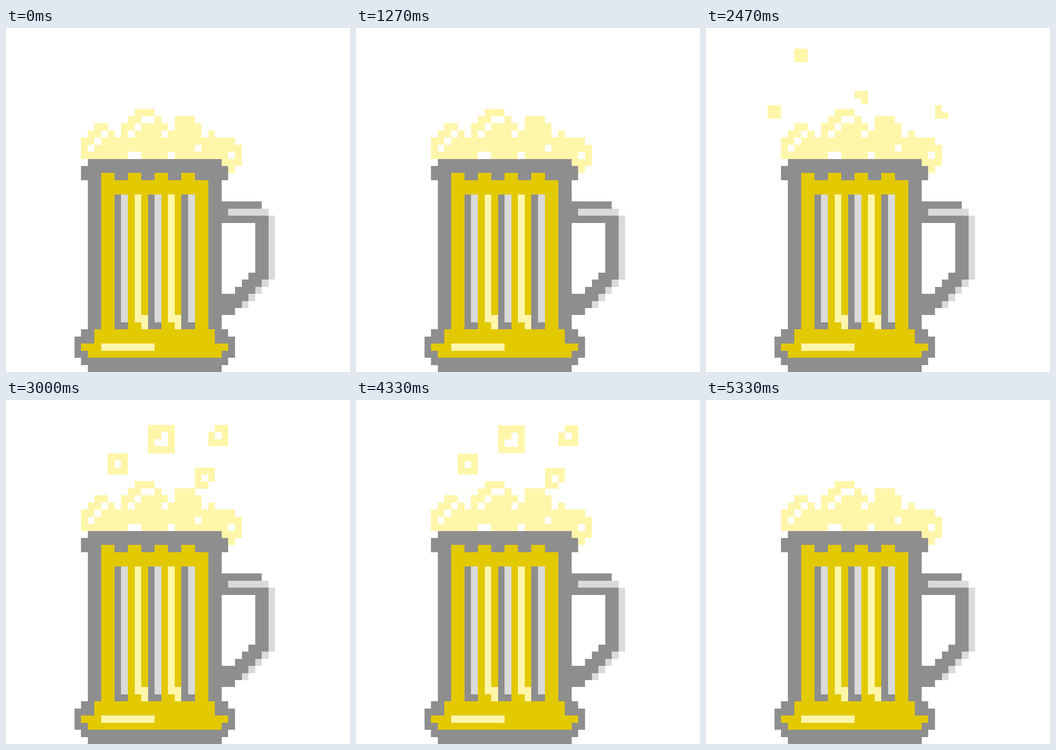
Animation, 748 px wide and 748 px high, one loop 5430 ms. Source, as an HTML page with a canvas:

```html
<!DOCTYPE html>
<html lang="en">
<head>
<meta charset="utf-8">
<title>Beer mug</title>
<style>
html, body { margin: 0; width: 100%; height: 100%; overflow: hidden; background: #fff; }
canvas { display: block; }
</style>
</head>
<body>
<canvas id="stage" width="748" height="748"></canvas>
<script>
const ctx = document.getElementById('stage').getContext('2d');
const CW = 14.56, CH = 15.45, LEFT = 148.5, TOP = 176.35;
const WHITE = '#fff', FOAM = '#fff6aa', GOLD = '#e2c900', GRAY = '#8e8e8e', LIGHT = '#dadada';
const LOOP = 5430, STARTS = [8, 48, 89, 130];
const BIG_STEPS = 16, ALL_STEPS = 30;

// Fills a block of grid cells; top is the y of row 0, crop trims the lower edge.
function block(color, col, row, w = 1, h = 1, top = TOP, crop = 0) {
  const x0 = Math.round(LEFT + col * CW), x1 = Math.round(LEFT + (col + w) * CW);
  const y0 = Math.round(top + row * CH), y1 = Math.round(top + (row + h) * CH - crop);
  ctx.fillStyle = color;
  ctx.fillRect(x0, y0, x1 - x0, y1 - y0);
}

function foam() {
  const f = (...a) => block(FOAM, ...a), hole = (...a) => block(WHITE, ...a);
  f(9, 0, 3);
  f(8, 1, 2); f(12, 1); f(15, 1, 3);
  f(3, 2, 2); f(7, 2, 2); f(10, 2, 4); f(15, 2, 4);
  f(2, 3, 2); f(5, 3); f(7, 3); f(9, 3, 4); f(14, 3, 5); f(20, 3);
  f(1, 4, 23); f(1, 5, 24, 2);
  f(22, 7, 3); f(23, 8);
  hole(3, 4); hole(2, 5); hole(18, 5);
  hole(8, 6, 2); hole(14, 6); hole(23, 6);
}

function body() {
  const g = (...a) => block(GRAY, ...a), b = (...a) => block(GOLD, ...a);
  g(2, 7, 20, 24);
  g(1, 8, 22, 2);
  b(4, 10, 16, 21);
  for (let c = 4; c <= 16; c += 4) b(c, 9, 2);
  for (const c of [6, 11, 16]) {
    g(c, 12, 2, 19);
    block(LIGHT, c + 1, 12, 1, 18);
  }
  for (const c of [9, 14]) {
    block(FOAM, c, 12, 1, 18);
    block(FOAM, c + 1, 29, 1, 2);
  }
}

function base() {
  const g = (...a) => block(GRAY, ...a), b = (...a) => block(GOLD, ...a);
  g(1, 31, 22); g(0, 32, 24, 3); g(1, 35, 22); g(2, 36, 20);
  b(3, 31, 18, 2); b(1, 33, 22); b(2, 34, 20);
  block(FOAM, 4, 33, 8);
}

function handle() {
  const g = (...a) => block(GRAY, ...a), l = (...a) => block(LIGHT, ...a);
  g(22, 13, 6); g(22, 14); l(23, 14, 6); g(22, 15, 7);
  g(27, 16, 2, 8); l(29, 15, 1, 9);
  g(26, 23);
  for (let i = 0; i < 4; i++) {
    g(25 - i, 24 + i, 3);
    l(28 - i, 24 + i);
  }
  g(22, 26, 2, 3);
}

function bigBubbles(top, crop) {
  const ring = (col, row, n) => block(FOAM, col, row, n, n, top, crop);
  const hole = (col, row, w = 1) => block(WHITE, col, row, w, 1, top);
  ring(11, 0, 4); hole(13, 1); hole(12, 2, 2);
  ring(20, 0, 3); hole(20, 0); hole(21, 1);
  ring(5, 4, 3); hole(6, 5);
  ring(18, 6, 3); hole(19, 7); hole(20, 8);
}

function smallBubbles(top) {
  const dot = (col, row) => block(FOAM, col, row, 2, 2, top, 1.8);
  const hole = (col, row) => block(WHITE, col, row, 1, 1, top);
  dot(3, 0);
  dot(12, 6); hole(12, 7);
  dot(-1, 8);
  dot(24, 8); hole(25, 8);
}

function draw(ms) {
  const tick = Math.floor((ms % LOOP) * 0.03 + 0.12);
  ctx.fillStyle = WHITE;
  ctx.fillRect(0, 0, 748, 748);
  foam();
  body();
  base();
  handle();
  const start = STARTS.find(s => tick >= s && tick < s + ALL_STEPS);
  if (start === undefined) return;
  const step = tick - start;
  if (step < BIG_STEPS) bigBubbles(55.4 - 1.51 * step, step ? 0 : 1.7);
  else smallBubbles(51.7 - 0.72 * (step - BIG_STEPS));
}

const began = performance.now();
function loop() {
  draw(performance.now() - began);
  requestAnimationFrame(loop);
}
loop();
</script>
</body>
</html>
```
